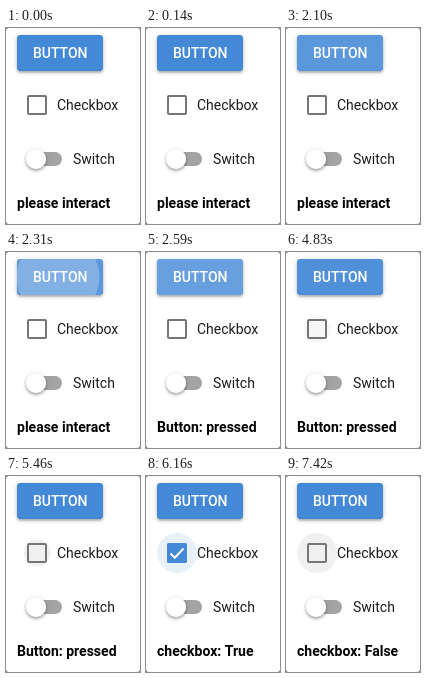
Animation, 134 px wide and 196 px high, one loop 8000 ms. Source, as an HTML page with a canvas:

```html
<!DOCTYPE html>
<html lang="en">
<head>
<meta charset="utf-8">
<title>Form controls</title>
<style>
html, body { margin: 0; width: 100%; height: 100%; overflow: hidden; background: #fff; }
canvas { display: block; width: 134px; height: 196px; }
</style>
</head>
<body>
<canvas id="stage"></canvas>
<script>
const W = 134, H = 196, LOOP = 8000, STEP = 70;
const BLUE = '#4489d6', GRAY = '#757575';
const canvas = document.getElementById('stage');
const ctx = canvas.getContext('2d');
const dpr = window.devicePixelRatio || 1;
canvas.width = Math.round(W * dpr);
canvas.height = Math.round(H * dpr);

// 0 before a, 1 after b, linear in between
const ramp = (t, a, b) => Math.min(1, Math.max(0, (t - a) / (b - a)));
const easeOut = p => 1 - (1 - p) * (1 - p);

function roundBox(x, y, w, h, r, fill) {
  ctx.beginPath();
  ctx.roundRect(x, y, w, h, r);
  ctx.fillStyle = fill;
  ctx.fill();
}

function disc(x, y, r, fill) {
  ctx.beginPath();
  ctx.arc(x, y, r, 0, Math.PI * 2);
  ctx.fillStyle = fill;
  ctx.fill();
}

function label(text, x, y, weight = 400, color = '#1c1c1c') {
  ctx.font = `${weight} 14px Roboto, sans-serif`;
  ctx.fillStyle = color;
  ctx.fillText(text, x, y);
}

function withShadow(dy, blur, alpha, draw) {
  ctx.save();
  ctx.shadowColor = `rgba(0,0,0,${alpha})`;
  ctx.shadowOffsetY = dy * dpr;
  ctx.shadowBlur = blur * dpr;
  draw();
  ctx.restore();
}

function buttonHover(t) {
  if (t < 2100) return 0;
  if (t < 4500) return 1 - ramp(t, 3990, 4130);
  return ramp(t, 4760, 4900) * (1 - ramp(t, 5250, 5460));
}

function drawButton(t) {
  const box = fill => roundBox(11, 7, 86, 36, 4, fill);
  withShadow(2, 2, 0.2, () => box(BLUE));
  withShadow(1, 5, 0.2, () => box(BLUE));
  box(`rgba(255,255,255,${0.12 * buttonHover(t)})`);
  if (t >= 2240 && t < 2660) {
    const grow = easeOut(ramp(t, 2170, 2450));
    const fade = 1 - ramp(t, 2450, 2660);
    ctx.save();
    ctx.beginPath();
    ctx.roundRect(11, 7, 86, 36, 4);
    ctx.clip();
    disc(52, 25, 10 + 42 * grow, `rgba(255,255,255,${0.24 * fade})`);
    ctx.restore();
  }
  label('BUTTON', 27, 30, 500, '#fff');
}

function drawCheckbox(t) {
  const x = 31, y = 77;
  const checked = ramp(t, 5950, 6160) * (1 - ramp(t, 7140, 7350));
  const hover = t < 4800 ? ramp(t, 3990, 4130) : 1 - ramp(t, 4760, 4900) + ramp(t, 5250, 5460);
  const focus = ramp(t, 5950, 6160);
  const tint = ramp(t, 7140, 7420);
  if (hover > 0) disc(x, y, 13.5, `rgba(0,0,0,${0.06 * hover * (1 - focus)})`);
  if (focus > 0) {
    disc(x, y, 13.5 + 6.5 * focus, `rgba(68,137,214,${0.12 * focus * (1 - tint)})`);
    disc(x, y, 20, `rgba(0,0,0,${0.06 * tint})`);
  }
  ctx.lineWidth = 2;
  ctx.strokeStyle = GRAY;
  ctx.beginPath();
  ctx.roundRect(22, 68, 18, 18, 1);
  ctx.stroke();
  if (checked > 0) {
    ctx.save();
    ctx.globalAlpha = checked;
    roundBox(21, 67, 20, 20, 2, BLUE);
    ctx.beginPath();
    ctx.moveTo(24.5, 77.5);
    ctx.lineTo(28.8, 81.8);
    ctx.lineTo(37.5, 72.5);
    ctx.strokeStyle = '#fff';
    ctx.stroke();
    ctx.restore();
  }
  label('Checkbox', 51, 82);
}

function drawSwitch() {
  roundBox(24, 124, 32, 14, 7, '#a3a3a3');
  withShadow(2, 3, 0.25, () => disc(30, 131, 10, '#fff'));
  withShadow(1, 4, 0.2, () => disc(30, 131, 10, '#fff'));
  label('Switch', 67, 136);
}

function status(t) {
  if (t < 2380) return 'please interact';
  if (t < 6090) return 'Button: pressed';
  return t < 7350 ? 'checkbox: True' : 'checkbox: False';
}

function draw(now) {
  const t = Math.floor((now % LOOP) / STEP) * STEP;
  ctx.setTransform(dpr, 0, 0, dpr, 0, 0);
  ctx.fillStyle = '#777';
  ctx.fillRect(0, 0, W, H);
  roundBox(0, 0, W, H, 3, '#fff');
  drawButton(t);
  drawCheckbox(t);
  drawSwitch();
  label(status(t), 11, 180, 700, '#000');
}

const start = performance.now();
function tick() {
  draw(performance.now() - start);
  requestAnimationFrame(tick);
}
tick();
</script>
</body>
</html>
```
